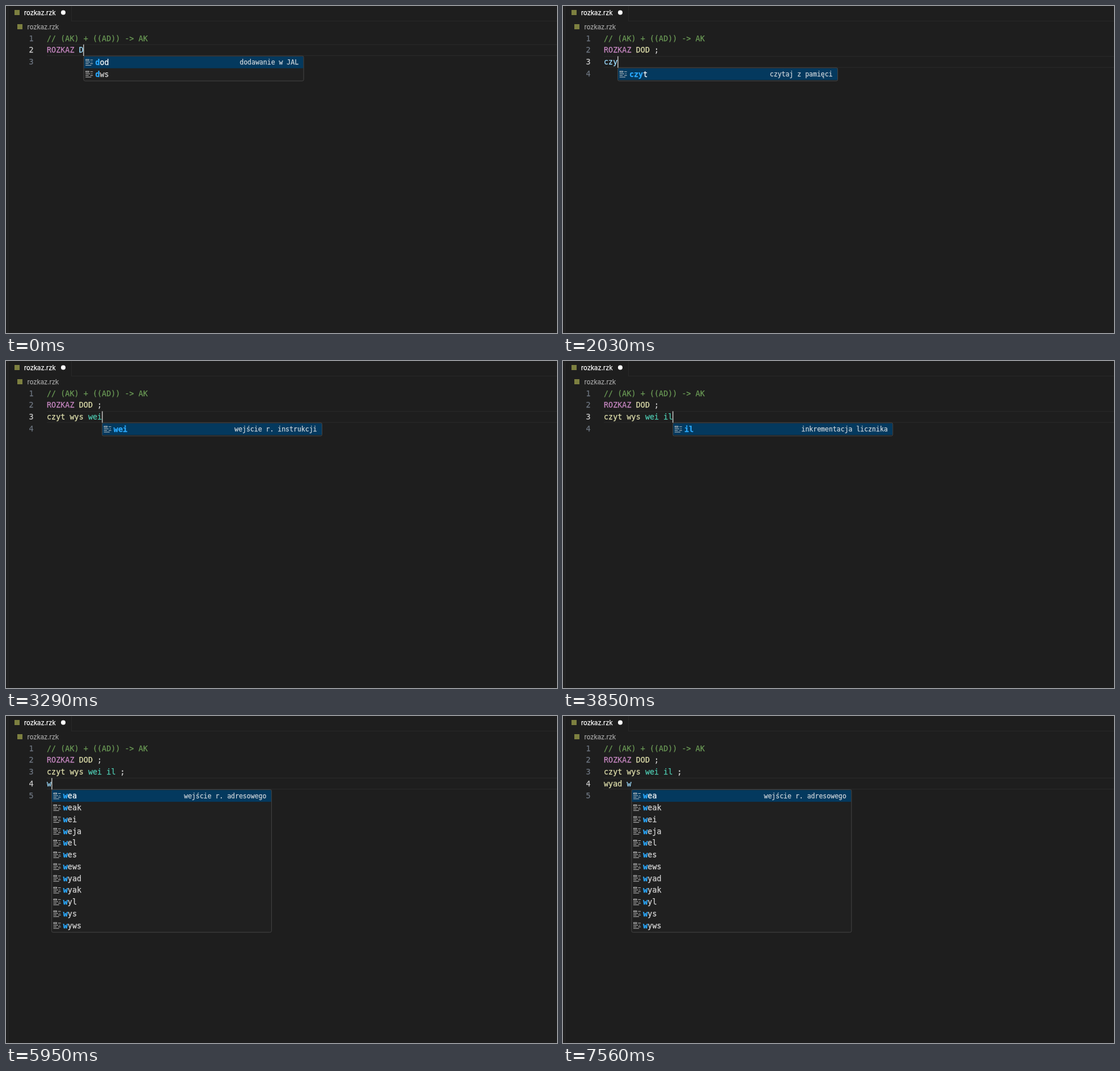
These frames come from a looping animation (972 by 576 pixels, 8 s). An HTML page with a canvas:

```html
<!DOCTYPE html>
<html lang="pl">
<head>
<meta charset="utf-8">
<title>rozkaz.rzk</title>
<style>
html, body { margin: 0; width: 100%; height: 100%; overflow: hidden; background: #1e1e1e; }
canvas { display: block; }
</style>
</head>
<body>
<canvas id="stage" width="972" height="576"></canvas>
<script>
const ctx = document.getElementById('stage').getContext('2d');
const LOOP = 8000;
const LEFT = 72, TOP = 46.5, ROW = 20.75, CELL = 8.1;
const MONO = '"DejaVu Sans Mono", monospace';
const CODE = '13.45px ' + MONO;
const BOLD = 'bold ' + CODE;
const DETAIL = '11.5px ' + MONO;
const UI = '11.3px Inter, sans-serif';

const HINTS = {
  czyt: 'czytaj z pamięci', dod: 'dodawanie w JAL', dws: 'dekrementacja WS',
  iak: 'inkrementacja AK', il: 'inkrementacja licznika',
  wea: 'wejście r. adresowego', weak: 'wejście akumulatora', wei: 'wejście r. instrukcji',
  weja: 'wejście JAL', wel: 'wejście licznika', wes: 'wejście r. słowowego',
  wews: 'wejście r. stosu', wyad: 'wyjście adresu', wyak: 'wyjście akumulatora',
  wyl: 'wyjście licznika', wys: 'wyjście r. słowowego', wyws: 'wyjście r. stosu'
};

const PLAIN = '#d4d4d4', NAME = '#9cdcfe', CALL = '#dcdcaa', TYPE = '#4ec9b0';
const COLORS = {
  ROZKAZ: '#c586c0', DOD: CALL, czyt: CALL, wys: CALL, wyad: CALL,
  wei: TYPE, il: TYPE, ';': PLAIN
};

const DONE = ['// (AK) + ((AD)) -> AK', 'ROZKAZ DOD ;', 'czyt wys wei il ;'];

// time, line index, text typed on it, flags: p = popup, r = last word not coloured yet
const STEPS = [
  [0, 1, 'ROZKAZ D', 'p'],
  [70, 1, 'ROZKAZ DO', 'p'],
  [630, 1, 'ROZKAZ DOD', 'pr'],
  [700, 1, 'ROZKAZ DOD', 'p'],
  [840, 1, 'ROZKAZ DOD ', ''],
  [980, 1, 'ROZKAZ DOD ;', ''],
  [1190, 2, '', ''],
  [1750, 2, 'c', 'p'],
  [1890, 2, 'cz', 'p'],
  [2030, 2, 'czy', 'p'],
  [2240, 2, 'czyt', 'pr'],
  [2310, 2, 'czyt', 'p'],
  [2380, 2, 'czyt ', ''],
  [2450, 2, 'czyt w', 'p'],
  [2590, 2, 'czyt wy', 'p'],
  [2660, 2, 'czyt wys', 'pr'],
  [2730, 2, 'czyt wys', 'p'],
  [2800, 2, 'czyt wys ', ''],
  [2940, 2, 'czyt wys w', ''],
  [3080, 2, 'czyt wys we', 'p'],
  [3220, 2, 'czyt wys wei', 'pr'],
  [3290, 2, 'czyt wys wei', 'p'],
  [3430, 2, 'czyt wys wei ', ''],
  [3570, 2, 'czyt wys wei i', ''],
  [3710, 2, 'czyt wys wei i', 'p'],
  [3850, 2, 'czyt wys wei il', 'p'],
  [4200, 2, 'czyt wys wei il ', ''],
  [4340, 2, 'czyt wys wei il ;', ''],
  [4480, 3, '', ''],
  [5950, 3, 'w', 'p'],
  [6020, 3, 'wy', ''],
  [6090, 3, 'wy', 'p'],
  [6860, 3, 'wyad', 'r'],
  [6930, 3, 'wyad', ''],
  [7000, 3, 'wyad ', ''],
  [7140, 3, 'wyad w', 'p']
];
const CARET_OFF = [[5040, 5530], [6580, 6860], [7560, LOOP]];

function rect(x, y, w, h, color) {
  ctx.fillStyle = color;
  ctx.fillRect(x, y, w, h);
}

// The hairline stroke gives the slightly heavier look of smoothed screen type
function text(str, x, y, color, font = CODE, align = 'left') {
  ctx.font = font;
  ctx.textAlign = align;
  ctx.fillStyle = ctx.strokeStyle = color;
  ctx.lineWidth = 0.25;
  ctx.fillText(str, x, y);
  ctx.strokeText(str, x, y);
}

function drawHeader() {
  rect(0, 0, 972, 576, '#1e1e1e');
  rect(3, 0, 1, 576, '#2a2a2a');
  rect(115, 0, 1, 27, '#282828');
  rect(115, 26, 857, 1, '#282828');
  rect(15, 7, 9, 9, '#7d8040');
  rect(20, 32, 9, 9, '#7d8040');
  text('rozkaz.rzk', 32, 16, '#ffffff', UI);
  text('rozkaz.rzk', 37.6, 41, '#a4a4a4', UI);
  ctx.fillStyle = '#ffffff';
  ctx.beginPath();
  ctx.arc(101, 11.5, 4, 0, Math.PI * 2);
  ctx.fill();
}

function drawLine(str, y, raw) {
  if (str.startsWith('//')) return text(str, LEFT, y, '#6a9955');
  for (const m of str.matchAll(/\S+/g)) {
    const last = m.index + m[0].length === str.length;
    const color = raw && last ? NAME : COLORS[m[0]] || NAME;
    text(m[0], LEFT + m.index * CELL, y, color);
  }
}

// Indices of the typed letters inside a word, or null if they do not all occur in order
function match(word, typed) {
  if (word[0] !== typed[0]) return null;
  const hits = [];
  let from = 0;
  for (const ch of typed) {
    const i = word.indexOf(ch, from);
    if (i < 0) return null;
    hits.push(i);
    from = i + 1;
  }
  return hits;
}

function drawItemIcon(x, cy) {
  const u = 0.93, color = '#cccccc';
  const bar = (bx, by, w, h = 1) => rect(x + bx * u, cy + (by - 8) * u, w * u, h * u, color);
  bar(1, 2, 7);
  bar(1, 4, 7);
  bar(1, 3, 1);
  bar(7, 3, 1);
  bar(10, 3, 5);
  bar(1, 7, 9);
  bar(12, 7, 2);
  bar(1, 10, 6);
  bar(10, 10, 5);
  bar(1, 13, 11);
}

function drawPopup(typed, x, y) {
  const items = Object.keys(HINTS)
    .map(word => ({ word, hits: match(word, typed) }))
    .filter(item => item.hits);
  const w = 388, h = items.length * ROW + 2.5;
  ctx.beginPath();
  ctx.roundRect(x, y, w, h, 2.5);
  ctx.fillStyle = '#202020';
  ctx.fill();
  rect(x + 0.5, y + 0.9, w - 1, ROW, '#04395e');
  ctx.strokeStyle = '#454545';
  ctx.lineWidth = 1;
  ctx.stroke();
  items.forEach(({ word, hits }, i) => {
    const cy = y + 0.9 + (i + 0.5) * ROW;
    drawItemIcon(x + 2.2, cy);
    [...word].forEach((ch, k) => {
      const hit = hits.includes(k);
      const color = hit ? '#2aaaff' : i ? PLAIN : '#ffffff';
      text(ch, x + 20.3 + k * CELL, cy + 4.7, color, hit ? BOLD : CODE);
    });
    if (i === 0) text(HINTS[word], x + 379, cy + 4.1, '#ccd3d9', DETAIL, 'right');
  });
}

function draw(time) {
  const [, row, typed, flags] = STEPS.findLast(step => step[0] <= time);
  const top = TOP + row * ROW;
  const caret = LEFT + typed.length * CELL;

  drawHeader();
  rect(LEFT, top, 900, 1.3, '#282828');
  rect(LEFT, top + ROW - 1.3, 900, 1.3, '#282828');

  const lines = [...DONE.slice(0, row), typed, ''];
  lines.forEach((line, i) => {
    const y = TOP + i * ROW + 15.1;
    text(i + 1, 48.6, y, i === row ? '#cccccc' : '#6e7681', CODE, 'right');
    drawLine(line, y, i === row && flags.includes('r'));
  });

  if (!CARET_OFF.some(([a, b]) => time >= a && time < b)) {
    rect(Math.floor(caret), top + 0.5, 1.7, ROW - 0.5, '#aeafad');
  }
  if (flags.includes('p')) {
    const word = typed.split(' ').pop().toLowerCase();
    drawPopup(word, caret + 0.3, top + ROW);
  }
}

const start = performance.now();
function tick() {
  draw((performance.now() - start) % LOOP);
  requestAnimationFrame(tick);
}
tick();
</script>
</body>
</html>
```
